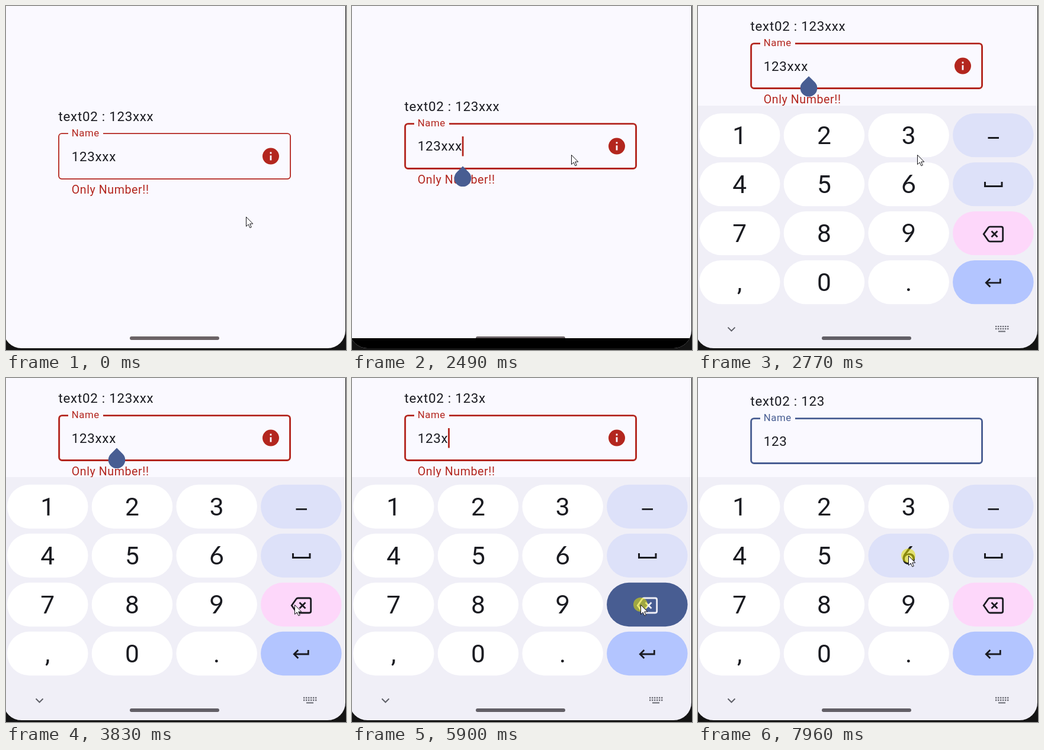
An HTML page with a canvas that plays this animation: 574 px wide and 583 px high, repeating every 8000 ms.

```html
<!DOCTYPE html>
<html lang="en">
<head>
<meta charset="utf-8">
<title>Number field</title>
<style>
  html, body { margin: 0; width: 100%; height: 100%; overflow: hidden; background: #141414; }
  canvas { display: block; }
</style>
</head>
<body>
<canvas id="stage" width="574" height="583"></canvas>
<script>
const ctx = document.getElementById('stage').getContext('2d');
const LOOP = 8000, STEP = 200 / 3;
const BG = '#faf9ff', INK = '#1a1b21', BOARD = '#f0eff7', TONAL = '#dde1f9';
const RED = [179, 38, 30], BLUE = [72, 93, 146];
const rgb = c => `rgb(${c.map(Math.round)})`;
const clamp = v => Math.min(1, Math.max(0, v));
const smooth = u => u * u * (3 - 2 * u);

// Pointer moves: start, end, goal x, goal y
const MOVES = [
  [563, 1163, 379, 260], [1163, 1363, 379, 245], [1563, 1696, 370, 252],
  [2963, 3830, 487, 384], [7496, 7830, 355, 301]
];
const TAPS = [[1830, 1890], [3890, 4030], [5290, 5370], [5900, 6040], [7960, 8000]];
const FOCUS = 2090, DELETES = [4290, 5570, 6300];

// The screen slides up for the keyboard, slow at both ends
const rise = q => 1 - (1 - clamp((q - 2430) / 285) ** 2.24) ** 3;
const pan = q => 153 * rise(q);

function pointer(q) {
  let x = 405, y = 357;
  for (const [from, to, gx, gy] of MOVES) {
    const f = smooth(clamp((q - from) / (to - from)));
    x += (gx - x) * f;
    y += (gy - y) * f;
  }
  return [Math.round(x), Math.round(y)];
}

function caretOn(t, q) {
  const last = [FOCUS, ...DELETES].filter(e => t >= e).pop();
  return last && Math.floor((q + 5 - last) / 500) % 2 < 1;
}

function box(x, y, w, h, r, color) {
  ctx.fillStyle = color;
  ctx.beginPath();
  ctx.roundRect(x, y, w, h, r);
  ctx.fill();
}

function disc(x, y, r, color) {
  ctx.fillStyle = color;
  ctx.beginPath();
  ctx.arc(x, y, r, 0, 7);
  ctx.fill();
}

function line(d, width, color) {
  ctx.strokeStyle = color;
  ctx.lineWidth = width;
  ctx.stroke(new Path2D(d));
}

function label(str, x, y, size, gap, color, font = 'Roboto', align = 'left') {
  ctx.font = `${size}px ${font}, sans-serif`;
  ctx.letterSpacing = gap + 'px';
  ctx.textAlign = align;
  ctx.fillStyle = color;
  ctx.fillText(str, x, y);
}

function drawForm(t, q) {
  const gone = DELETES.filter(d => t >= d).length;
  const value = '123xxx'.slice(0, 6 - gone);
  const valid = gone === 3;
  const mix = clamp((q - 6297) / 150);
  const accent = rgb(RED.map((v, i) => v + (BLUE[i] - v) * mix));
  const lw = t < 2430 ? 1.8 : 2.9;

  ctx.save();
  ctx.translate(0, (valid ? 5 : 0) - pan(q));
  label('text02 : ' + value, 88.5, 195, 22.4, 0.7, INK);
  ctx.strokeStyle = accent;
  ctx.lineWidth = lw;
  ctx.beginPath();
  ctx.roundRect(88.2 + lw / 2, 215.2 + lw / 2, 392.8 - lw, 78.8 - lw, 5);
  ctx.stroke();
  box(105, 212, 59, 8, 0, BG);
  label('Name', 110.7, 221, 16.8, 0.56, accent);
  label(value, 110.7, 262.5, 22.4, 0.7, INK);
  if (caretOn(t, q)) box(185.7 - 11.8 * gone, 238, 2.8, 33.6, 0, accent);
  if (!valid) {
    disc(447, 254.6, 14, accent);
    box(445.6, 247.6, 2.8, 2.8, 0, BG);
    box(445.6, 253.2, 2.8, 8.4, 0, BG);
    label('Only Number!!', 110.7, 318, 19.6, 0.58, accent);
  }
  ctx.restore();
}

// The drop trails the field by one step
function drawHandle(q) {
  ctx.save();
  ctx.translate(187, 291.8 - pan(q - STEP));
  ctx.rotate(Math.PI / 4);
  box(-14.3, -14.3, 28.6, 28.6, [0, 14.3, 14.3, 14.3], rgb(BLUE));
  ctx.restore();
}

function drawKeys(tap) {
  const side = [TONAL, TONAL, '#fdd7fa', '#b3c5ff'];
  let deleting = false;
  ['123–', '456_', '789<', ',0.>'].forEach((row, r) => [...row].forEach((ch, c) => {
    const x = 2 + 142.7 * c, y = 180.8 + 83 * r;
    const down = tap && tap[0] > x && tap[0] < x + 137 && tap[1] > y && tap[1] < y + 75;
    if (c < 3) {
      box(x, y, 136.5, 74.4, 37.2, down ? TONAL : '#fff');
      label(ch, x + 68.2, y + 52.2, 42.5, 0, INK, /[69]/.test(ch) ? 'Lato' : 'Roboto', 'center');
    } else {
      box(x, y, 136.5, 74.4, 37.2, down ? rgb(BLUE) : side[r]);
      deleting ||= down;
    }
  }));
  box(489.5, 221, 18.5, 2.8, 0, INK);
  line('M484.5 297V304.5H513V297', 3, INK);
  line('M482.3 385.5L490 374.5Q491.2 373 493 373H512Q514.7 373 514.7 376V395Q514.7 398 512 398H493'
    + 'Q491.2 398 490 396.5ZM495.5 380.5L505.5 390.5M505.5 380.5L495.5 390.5', 2.8, deleting ? BOARD : INK);
  line('M510.3 461V468H487M493.3 461L486.3 468L493.3 475', 2.8, INK);
}

function drawBoard(top, tap) {
  ctx.save();
  ctx.translate(0, top - 168);
  box(-4, 168, 580, 420, 0, BOARD);
  drawKeys(tap);
  line('M50.5 543.5L56.5 549.5L62.5 543.5', 2, '#5f6068');
  for (let i = 0; i < 12; i++) box(502 + i % 6 * 4, i < 6 ? 540.8 : 544.8, 2.4, 2.4, 0, '#6b6c75');
  box(507, 549.4, 12, 2, 0, '#6b6c75');
  ctx.restore();
}

function drawPointer(x, y, tapped) {
  if (tapped) disc(x, y, 12, 'rgba(232,226,0,.55)');
  ctx.save();
  ctx.translate(x + 0.5, y + 0.5);
  const arrow = 'M0 0V16L3.7 12.6L6.4 18.4L8.8 17.3L6.2 11.6H11.3Z';
  ctx.fillStyle = '#fff';
  ctx.fill(new Path2D(arrow));
  line(arrow, 1, '#15151a');
  ctx.restore();
}

function draw(t) {
  // Motion advances 15 times a second
  const q = 30 + Math.floor((t - 23) / STEP) * STEP;
  const at = pointer(q);
  const tapped = TAPS.some(([a, b]) => t >= a && t < b);
  const top = 580 - 412 * rise(q - STEP);
  const boardUp = top < 579;

  ctx.fillStyle = '#141414';
  ctx.fillRect(0, 0, 574, 583);
  ctx.save();
  ctx.beginPath();
  ctx.roundRect(-4, -50, 577, 630, 30);
  ctx.clip();
  ctx.fillStyle = BG;
  ctx.fillRect(0, 0, 574, 583);
  drawForm(t, q);
  if (t >= 2290 && t < 4370) drawHandle(q);
  if (!boardUp) box(209, 560, 151, 6, 3, '#6b6366');
  box(-4, 580 - pan(q), 580, 200, 0, '#000');
  if (boardUp) {
    drawBoard(top, tapped && at);
    box(209, 560, 151, 6, 3, '#625f66');
  }
  ctx.restore();
  drawPointer(...at, tapped);
}

const start = performance.now();
function tick() {
  draw((performance.now() - start) % LOOP);
  requestAnimationFrame(tick);
}
tick();
</script>
</body>
</html>
```
